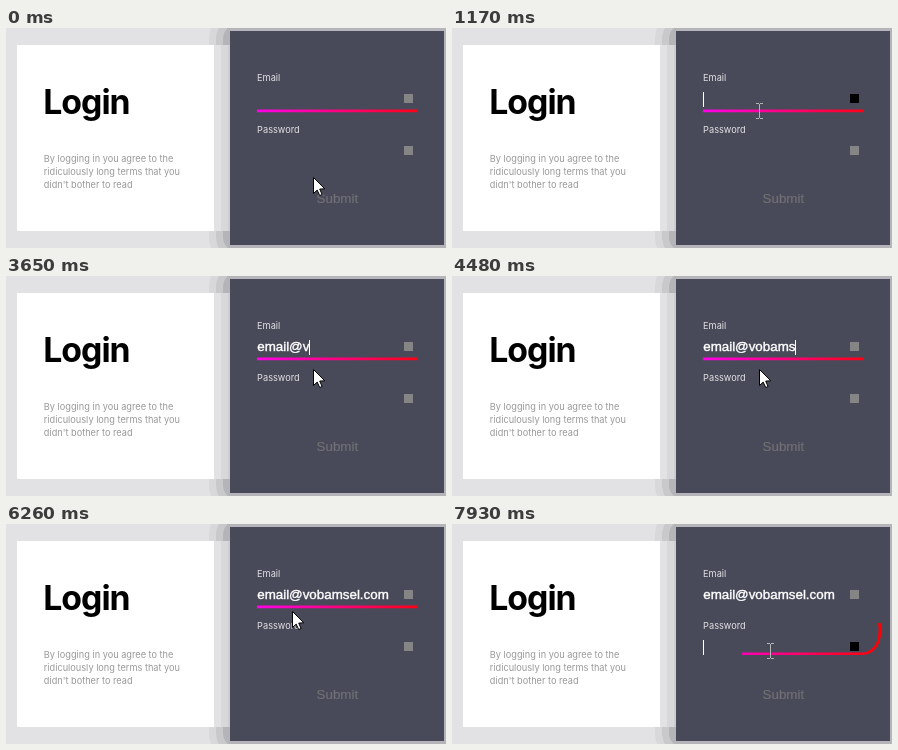
These frames come from a looping animation (440 px wide and 220 px high, 7990 ms). An HTML page with a canvas:

```html
<!DOCTYPE html>
<html lang="en">
<head>
<meta charset="utf-8">
<title>Login form</title>
<style>
html, body { margin: 0; width: 100%; height: 100%; overflow: hidden; background: #e2e2e5; }
canvas { display: block; width: 440px; height: 220px; }
</style>
</head>
<body>
<canvas id="stage" width="440" height="220"></canvas>
<script>
const ctx = document.getElementById('stage').getContext('2d', { alpha: false });
const LOOP = 7990;
const SCALE = 0.668;
const SMALL = '9.2px Inter, sans-serif';
const INPUT = '13.36px "Liberation Sans", Arial, sans-serif';
const SPEED = 0.2;    // pointer, px per ms
const BLINK = 515;    // caret half period
const READY = 960;    // first caret in the email field
const BLUR = 6880;    // email field is left
const FOCUS = 7685;   // password field is clicked
const FIELDS = [61, 113];

// Each burst is typed at its own pace, in ms per key
const BURSTS = [
  { word: 'emai', at: 1750, pace: 110 },
  { word: 'l@', at: 2540, pace: 500 },
  { word: 'vobamsel', at: 3650, pace: 155 },
  { word: '.com', at: 5220, pace: 150 }
];

const START = { x: 307, y: 149 };
const STOPS = [
  { at: 430, x: 307, y: 71 },
  { at: 1110, x: 307, y: 93 },
  { at: 6140, x: 286, y: 87 },
  { at: 6315, x: 293, y: 98 },
  { at: 6550, x: 297, y: 110 },
  { at: 7280, x: 306, y: 106 },
  { at: 7680, x: 318, y: 127 }
];

function rect(x, y, w, h, color) {
  ctx.fillStyle = color;
  ctx.fillRect(x, y, w, h);
}

function text(str, x, y, font, color, bolder = 0) {
  ctx.font = font;
  ctx.fillStyle = ctx.strokeStyle = color;
  ctx.fillText(str, x, y);
  if (bolder) {
    ctx.lineWidth = bolder;
    ctx.strokeText(str, x, y);
  }
}

function pointerAt(t) {
  let { x, y } = START;
  for (const stop of STOPS) {
    const dx = stop.x - x, dy = stop.y - y;
    const part = Math.min(1, Math.max(0, t - stop.at) * SPEED / Math.hypot(dx, dy));
    x += dx * part;
    y += dy * part;
    if (part < 1) break;
  }
  return { x: Math.round(x), y: Math.round(y) };
}

function typing(t) {
  let typed = '', lastKey = READY;
  for (const { word, at, pace } of BURSTS) {
    if (t < at) break;
    const count = Math.min(word.length, Math.floor((t - at) / pace) + 1);
    typed += word.slice(0, count);
    lastKey = at + (count - 1) * pace;
  }
  return { typed, lastKey };
}

function caretOn(t, since) {
  return t >= since && Math.floor((t - since) / BLINK) % 2 === 0;
}

// Stepped shadow of the right panel, from the outside in
function shadow(spread, step, colors) {
  for (const color of colors) {
    ctx.fillStyle = color;
    ctx.beginPath();
    ctx.roundRect(224 - spread, 3 - spread, 214 + 2 * spread, 214 + 2 * spread, spread + 8);
    ctx.fill();
    spread -= step;
  }
}

function panels() {
  rect(0, 0, 440, 220, '#e2e2e5');
  shadow(21, 7, ['#d8d8da', '#c9c9cb', '#b5b5b9']);
  ctx.save();
  ctx.beginPath();
  ctx.rect(11, 17, 213, 186);
  ctx.clip();
  rect(11, 17, 213, 186, '#fff');
  shadow(16, 7, ['#e2e2e4', '#d8d8da', '#cdcdd0']);
  ctx.restore();
  rect(224, 3, 214, 214, '#494a59');

  ctx.letterSpacing = '-1px';
  text('Login', 37.2, 85.5, '700 33.8px Inter, sans-serif', '#000');
  ctx.letterSpacing = '0px';
  ['By logging in you agree to the', 'ridiculously long terms that you', "didn't bother to read"]
    .forEach((line, i) => text(line, 37.8, 134 + 13 * i, SMALL, '#999'));
  text('Email', 251.1, 53, SMALL, '#e0e0e3');
  text('Password', 251.1, 105, SMALL, '#e0e0e3');
  text('Submit', 310.6, 175, INPUT, '#707075', 0.2);
}

function underline(t) {
  const ease = 1 - (1 - Math.min(1, Math.max(0, t - FOCUS) / 700)) ** 4;
  ctx.save();
  ctx.translate(224.2, 2.8);
  ctx.scale(SCALE, SCALE);
  const grad = ctx.createLinearGradient(13, 0, 307, 0);
  grad.addColorStop(0, '#f0f');
  grad.addColorStop(1, '#f00');
  ctx.strokeStyle = grad;
  ctx.lineWidth = 4;
  ctx.setLineDash([240, 1386]);
  ctx.lineDashOffset = -336 * ease;
  ctx.beginPath();
  ctx.moveTo(40, 120);
  ctx.lineTo(280, 120);
  ctx.bezierCurveTo(280, 120, 305, 120.8, 305, 155);
  ctx.bezierCurveTo(305, 189.2, 280, 190, 280, 190);
  ctx.lineTo(40, 190);
  ctx.stroke();
  ctx.restore();
}

function arrow(x, y) {
  ctx.save();
  ctx.translate(x + 0.5, y + 0.5);
  ctx.beginPath();
  [[0, 0], [0, 16], [3.7, 12.6], [6.2, 18], [8.6, 17], [6.2, 11.6], [11.3, 11.3]]
    .forEach(p => ctx.lineTo(...p));
  ctx.closePath();
  ctx.fillStyle = '#fff';
  ctx.strokeStyle = '#000';
  ctx.lineWidth = 1;
  ctx.fill();
  ctx.stroke();
  ctx.restore();
}

function beam(x, y) {
  const color = '#b4b4b8';
  rect(x, y - 7, 1, 14, color);
  for (const edge of [y - 8, y + 7]) {
    rect(x - 3, edge, 3, 1, color);
    rect(x + 1, edge, 3, 1, color);
  }
}

function draw() {
  const t = performance.now() % LOOP;
  const pointer = pointerAt(t);
  const hover = FIELDS.map(top => pointer.y >= top && pointer.y < top + 23);
  panels();
  underline(t);
  FIELDS.forEach((top, i) => rect(398, top + 5, 9, 9, hover[i] ? '#000' : '#858585'));

  const { typed, lastKey } = typing(t);
  text(typed, 251.2, 75, INPUT, '#fff', 0.4);
  if (t < BLUR && caretOn(t, lastKey)) {
    rect(Math.round(251 + ctx.measureText(typed).width), 64, 1, 15, '#fff');
  }
  if (caretOn(t, FOCUS)) rect(251, 116, 1, 15, '#fff');

  (hover.includes(true) ? beam : arrow)(pointer.x, pointer.y);
  requestAnimationFrame(draw);
}
draw();
</script>
</body>
</html>
```
